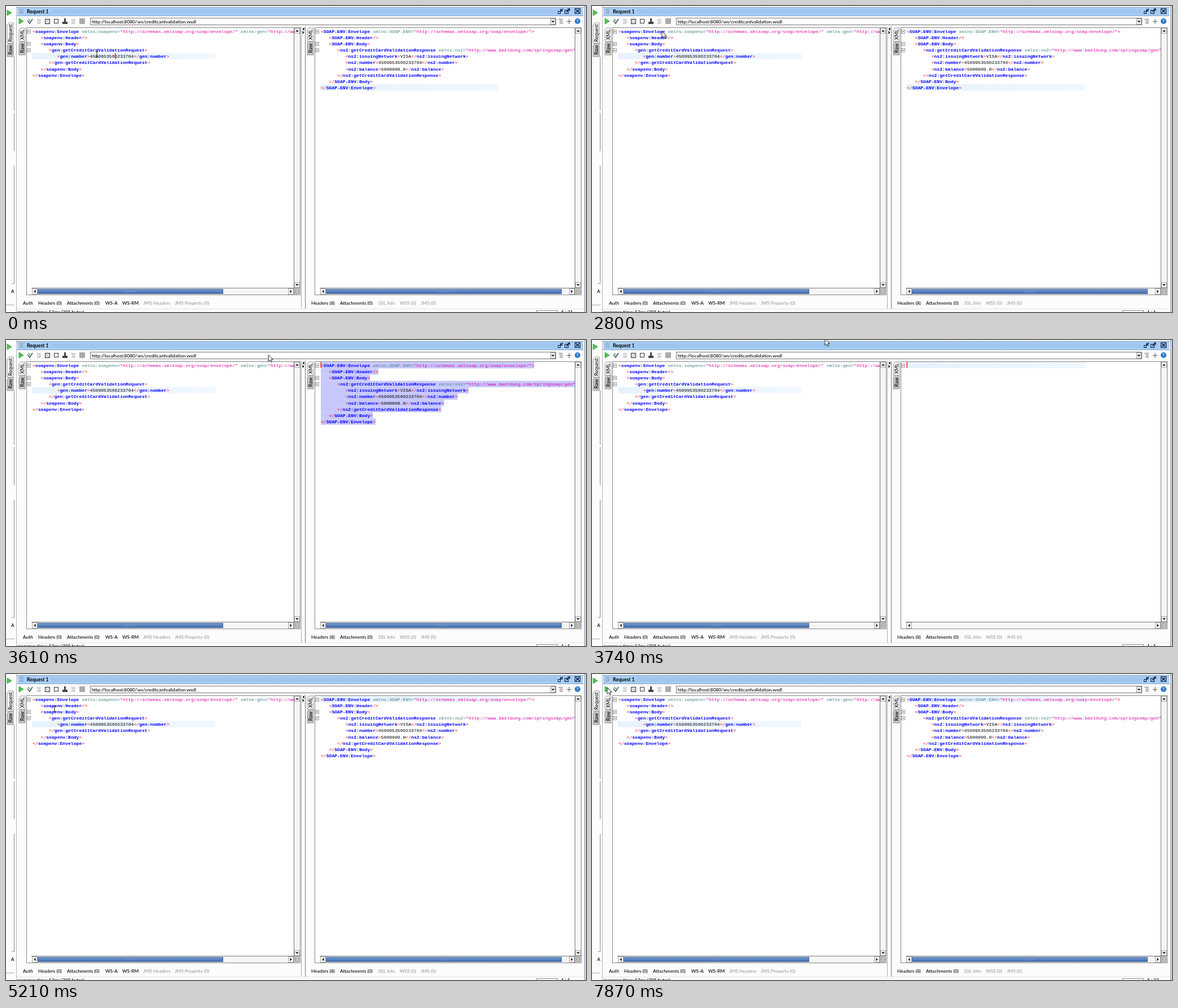
An HTML page with a canvas that plays this animation: 1028x544 px, repeating every 8 s.

```html
<!DOCTYPE html>
<html>
<head>
<meta charset="utf-8">
<style>
html, body { margin: 0; width: 100%; height: 100%; overflow: hidden; background: #fcfcfc; }
canvas { display: block; }
</style>
</head>
<body>
<canvas id="stage" width="1028" height="544"></canvas>
<script>
const ctx = document.getElementById('stage').getContext('2d');
const LOOP = 8000, TICKS = 60;
const CHAR = 4.85, LINE = 11.14, TOP = 39.5;
const UI = 'Lato, sans-serif', MONO = '"Liberation Mono", monospace';
const NS = '"http://www.baeldung.com/springsoap/gen">';
const SOAP = '"http://schemas.xmlsoap.org/soap/envelope/"';

const request = number => [
  `<soapenv:Envelope xmlns:soapenv=${SOAP} xmlns:gen=${NS}`,
  '   <soapenv:Header/>',
  '   <soapenv:Body>',
  '      <gen:getCreditCardValidationRequest>',
  `         <gen:number>${number}</gen:number>`,
  '      </gen:getCreditCardValidationRequest>',
  '   </soapenv:Body>',
  '</soapenv:Envelope>'
];
const response = [
  `<SOAP-ENV:Envelope xmlns:SOAP-ENV=${SOAP}>`,
  '   <SOAP-ENV:Header/>',
  '   <SOAP-ENV:Body>',
  `      <ns2:getCreditCardValidationResponse xmlns:ns2=${NS}`,
  '         <ns2:issuingNetwork>VISA</ns2:issuingNetwork>',
  '         <ns2:number>4509953566233704</ns2:number>',
  '         <ns2:balance>5000000.0</ns2:balance>',
  '      </ns2:getCreditCardValidationResponse>',
  '   </SOAP-ENV:Body>',
  '</SOAP-ENV:Envelope>'
];

// pointer track: tick, x, y
const track = [
  [0, 161, 86], [2, 165, 112], [5, 110, 80], [9, 27, 24], [20, 27, 24], [21, 124, 45],
  [22, 240, 80], [24, 655, 146], [26, 517, 55], [28, 413, -2], [33, 28, 24], [35, 4, 20],
  [36, 27, 24], [37, 27, 24], [39, 86, 62], [42, 140, 112], [45, 155, 92], [48, 149, 92],
  [50, 160, 102], [56, 160, 102], [59, 27, 24], [60, 27, 24]
];

function fill(color, x, y, w, h) { ctx.fillStyle = color; ctx.fillRect(x, y, w, h); }
function box(x, y, w, h, color, bg) {
  if (bg) fill(bg, x, y, w, h);
  ctx.strokeStyle = color;
  ctx.lineWidth = 1;
  ctx.strokeRect(x + .5, y + .5, w - 1, h - 1);
}
function poly(points, color, stroke) {
  ctx.beginPath();
  points.forEach(([x, y]) => ctx.lineTo(x, y));
  ctx.closePath();
  ctx.fillStyle = color;
  ctx.fill();
  if (stroke) { ctx.strokeStyle = stroke; ctx.lineWidth = .9; ctx.stroke(); }
}
function line(points, color, width = 1) {
  ctx.beginPath();
  points.forEach(([x, y]) => ctx.lineTo(x, y));
  ctx.strokeStyle = color;
  ctx.lineWidth = width;
  ctx.stroke();
}
function label(text, x, y, color = '#000', font = '500 8.3px ' + UI) {
  ctx.font = font;
  ctx.fillStyle = color;
  ctx.fillText(text, x, y);
}
function triangle(x, y, angle, size = 3) {
  ctx.save();
  ctx.translate(x, y);
  ctx.rotate(angle);
  poly([[-size, size / 2], [size, size / 2], [0, -size / 2]], '#111');
  ctx.restore();
}
function play(x, y) { poly([[x, y - 5], [x + 8, y], [x, y + 5]], '#4fc052', '#3aa343'); }
function soapIcon(x, y) {
  label('SO', x, y - 1, '#777', '5px ' + UI);
  label('AP', x, y + 4, '#777', '5px ' + UI);
}
function tab(text, x, y, h, selected) {
  poly([[x + 11, y], [x + 3, y], [x, y + 4], [x, y + h], [x + 11, y + h]],
    selected ? '#c4c4c4' : '#fcfcfc', '#8c8c8c');
  ctx.save();
  ctx.translate(x + 8.5, y + h / 2);
  ctx.rotate(-Math.PI / 2);
  ctx.textAlign = 'center';
  label(text, 0, 0, '#000', '500 8.8px ' + UI);
  ctx.restore();
}

function drawCode(lines, x) {
  lines.forEach((text, row) => {
    let inTag = false, named = false;
    for (const match of text.matchAll(/<\/?|\/?>|"[^"]*"?|[^<>"\s\/=]+=?/g)) {
      const part = match[0];
      let color = '#000', bold = false;
      if (part[0] === '<') { color = '#f00'; inTag = true; named = false; }
      else if (part.endsWith('>')) { color = '#f00'; inTag = false; }
      else if (part[0] === '"') color = '#dc009c';
      else if (inTag && !named) { color = '#00f'; bold = named = true; }
      else if (inTag) color = '#3f7f7f';
      label(part, x + match.index * CHAR, TOP + row * LINE + 8.2, color, (bold ? 'bold ' : '') + '8.08px ' + MONO);
    }
  });
}
function lineHighlight(x, row) {
  const g = ctx.createLinearGradient(x, 0, x + 325, 0);
  g.addColorStop(0, '#e6f2fe');
  g.addColorStop(1, '#f0f7ff');
  fill(g, x - 1, TOP + row * LINE - .5, 316 + (x < 500 ? 9 : 0), LINE);
}
function select(x, row, from, to) {
  fill('#c8c8ff', x + from * CHAR, TOP + row * LINE - .3, (to - from) * CHAR, LINE + .1);
}
function caret(x, row, col) { fill('#f00', x + col * CHAR - .5, TOP + row * LINE, 1.4, 10); }
function folds(x, rows) {
  rows.forEach(row => {
    const y = Math.round(TOP + row * LINE + 2);
    box(x, y, 7, 7, '#999', '#fff');
    fill('#555', x + 2, y + 3, 3, 1);
  });
}

function pane(x, right, thumbEnd) {
  box(x, 38, right - x, 476, '#858585', '#fff');
  const bar = right - 11;
  fill('#f6f6f6', bar, 39, 10, 474);
  fill('#f6f6f6', x + 10, 502, bar - x - 10, 11);
  line([[bar - .5, 39], [bar - .5, 513]], '#777');
  line([[x + 9, 501.5], [right - 1, 501.5]], '#777');
  box(bar, 39, 10, 10, '#a8a8a8', '#f4f4f4');
  box(bar, 491, 10, 10, '#a8a8a8', '#f4f4f4');
  triangle(bar + 5, 44, 0);
  triangle(bar + 5, 496, Math.PI);
  box(x + 10, 502, 10, 11, '#a8a8a8', '#f4f4f4');
  box(bar - 11, 502, 10, 11, '#a8a8a8', '#f4f4f4');
  triangle(x + 15, 507.5, -Math.PI / 2);
  triangle(bar - 6, 507.5, Math.PI / 2);
  box(bar + 1, 503, 8, 9, '#777', '#f1eee8');
  ctx.beginPath();
  ctx.arc(bar + 5, 507.5, 2, 0, 7);
  ctx.strokeStyle = '#765';
  ctx.stroke();
  if (!thumbEnd) return;
  const start = x + 20, g = ctx.createLinearGradient(0, 502, 0, 513);
  g.addColorStop(0, '#87aada');
  g.addColorStop(.4, '#6088c4');
  g.addColorStop(1, '#3c62a0');
  box(start, 503, thumbEnd - start, 9, '#4569a3', g);
  const mid = (start + thumbEnd) / 2;
  for (let i = -10; i < 10; i += 2) fill('#9bbbe5', mid + i, 506 + (i & 2), 1, 1);
}

function drawTitle() {
  fill('#a6cdf5', 20, 3, 1003, 14);
  for (let x = 80; x < 974; x += 4)
    for (let i = 0; i < 4; i++) {
      fill('#86b0dc', x + i, 13 - i, 1, 1);
      fill('#86b0dc', x + i, 9 - i, 1, 1);
    }
  line([[19, 2.5], [1024, 2.5]], '#7f9fbd');
  line([[19, 17.5], [1024, 17.5]], '#8daac5');
  soapIcon(24, 10);
  label('Request 1', 37, 13, '#000', 'bold 8.7px ' + UI);
  box(978, 9, 5, 5, '#013');
  line([[987, 5], [983, 9]], '#013', 1.6);
  line([[983, 5], [983, 9], [987, 9]], '#013', 1.2);
  box(990, 7, 7, 7, '#013');
  line([[993, 11], [999, 5]], '#013', 1.6);
  line([[995, 5], [999, 5], [999, 9]], '#013', 1.2);
  box(1008, 4, 10, 10, '#013');
  line([[1010, 6], [1016, 12]], '#013', 1.6);
  line([[1016, 6], [1010, 12]], '#013', 1.6);
}

function drawToolbar() {
  play(23, 27);
  line([[38, 26], [42, 31], [47, 23]], '#567', 1.8);
  line([[39, 23], [43, 27]], '#4a4', 1.4);
  soapIcon(55, 28);
  box(69, 23, 9, 9, '#223');
  for (let i = 0; i < 3; i++) {
    fill('#335', 71 + i * 2, 25 + i * 2, 1, 1);
    fill('#335', 75 - i * 2, 25 + i * 2, 1, 1);
  }
  box(85, 23, 8, 8, '#333');
  fill('#444', 103, 22, 3, 6);
  fill('#444', 100, 28, 9, 4);
  soapIcon(116, 28);
  fill('#aaa', 130, 22, 10, 10);
  box(149, 21, 826, 13, '#777', '#fff');
  label('http://localhost:8080/ws/creditcardvalidation.wsdl', 152, 30.5);
  box(965, 22, 9, 11, '#999', '#f4f4f4');
  triangle(969.5, 28, Math.PI);
  for (let i = 0; i < 4; i++) fill('#777', 979 + (i ? 2 : 0), 23 + i * 2.5, 8 - (i ? 2 : 0), 1);
  fill('#555', 994, 27, 8, 1);
  fill('#555', 997.5, 23, 1, 9);
  ctx.beginPath();
  ctx.arc(1013, 27, 5, 0, 7);
  ctx.fillStyle = '#2c78c8';
  ctx.fill();
  label('?', 1011, 30, '#fff', 'bold 8px ' + UI);
}

function drawFrame(position) {
  fill('#fcfcfc', 0, 0, 1028, 544);
  play(2, 12);
  tab('Request', 2, 30, 36);
  tab('Raw', 2, 66, 24, true);
  line([[14.5, 90], [14.5, 186]], '#888');
  line([[14.5, 190], [14.5, 258]], '#888');
  line([[14.5, 284], [14.5, 494]], '#888');
  line([[10, 493.5], [15, 493.5]], '#999');
  label('A', 9, 510);
  line([[0, 531.5], [15, 531.5]], '#aaa');
  line([[18.5, 0], [18.5, 544]], '#b5b5b5');
  line([[1026, 0], [1026, 544]], '#8395a8', 1.5);
  drawTitle();
  drawToolbar();
  for (const x of [23, 534]) {
    tab('XML', x, 39, 24);
    tab('Raw', x, 63, 24, true);
  }
  line([[523.5, 37], [523.5, 538]], '#aaa');
  line([[530.5, 37], [530.5, 538]], '#777');
  triangle(527, 41, -Math.PI / 2);
  triangle(527, 47, Math.PI / 2);
  const tabs = [['Auth', 30], ['Headers (0)', 57], ['Attachments (0)', 108], ['WS-A', 176], ['WS-RM', 206],
    ['JMS Headers', 243, 1], ['JMS Property (0)', 299, 1], ['Headers (8)', 541], ['Attachments (0)', 592],
    ['SSL Info', 660, 1], ['WSS (0)', 698, 1], ['JMS (0)', 735, 1]];
  tabs.forEach(([text, x, off]) => label(text, x, 531, off ? '#999' : '#000'));
  line([[19, 538.5], [1024, 538.5]], '#e4e4e4');
  label('response time: 12ms (395 bytes)', 20, 546.5);
  box(940, 541, 38, 10, '#888', '#fff');
  label(position, 984, 546.5);
}

function drawPointer(t) {
  const tick = Math.floor(t * TICKS / LOOP);
  const i = track.findIndex(p => p[0] > tick);
  const [a, b] = [track[i - 1], track[i]], k = (tick - a[0]) / (b[0] - a[0]);
  const x = a[1] + (b[1] - a[1]) * k, y = a[2] + (b[2] - a[2]) * k;
  const overText = y > 55 && (x > 45 && x < 510 || x > 557 && x < 1008);
  if (overText) {
    line([[x - 2.5, y - 5], [x + 2.5, y - 5]], '#222');
    line([[x, y - 5], [x, y + 5]], '#222');
    line([[x - 2.5, y + 5], [x + 2.5, y + 5]], '#222');
  } else {
    poly([[0, 0], [0, 11.5], [2.7, 9], [4.7, 13], [6.5, 12.2], [4.7, 8.3], [8.2, 8.3]]
      .map(([dx, dy]) => [x + dx, y + dy]), '#fff', '#111');
  }
}

function draw(t) {
  const within = (from, to) => t >= from && t < to;
  const cleared = within(3740, 4540);
  const position = within(1300, 3330) || within(3600, 6130) ? '1 : 1' : within(3330, 3600) ? '6 : 9'
    : t < 1300 ? '5 : 31' : '5 : 23';
  drawFrame(position);

  pane(36, 522, 385);
  folds(37, [0, 2, 3]);
  ctx.save();
  ctx.beginPath();
  ctx.rect(45, 39, 465, 462);
  ctx.clip();
  if (!within(6400, 7160)) lineHighlight(47, 4);
  else select(47, 4, 21, 22);
  drawCode(request(t < 7160 ? '4509953566233704' : '5509953566233704'), 47);
  if (t < 540) caret(47, 4, 30.2);
  if (within(6130, 6400)) caret(47, 4, 22);
  ctx.restore();

  pane(547, 1020, cleared ? 0 : 985);
  folds(548, cleared ? [0] : [0, 2, 3]);
  ctx.save();
  ctx.beginPath();
  ctx.rect(556, 39, 452, 462);
  ctx.clip();
  if (t < 3330) lineHighlight(558, 9);
  else if (t < 3740) {
    const first = t < 3600 ? 5 : 0, col = first ? 8 : 0;
    for (let row = first; row < 10; row++) select(558, row, row === first ? col : 0, response[row].length);
    caret(558, first, col);
  } else lineHighlight(558, 0);
  if (!cleared) drawCode(response, 558);
  if (within(1300, 1680) || within(2380, 2520) || within(3740, 4200) || within(4680, 5070) || within(5470, 5870))
    caret(558, 0, 0);
  ctx.restore();

  drawPointer(t);
}

function loop() {
  draw(performance.now() % LOOP);
  requestAnimationFrame(loop);
}
loop();
</script>
</body>
</html>
```
